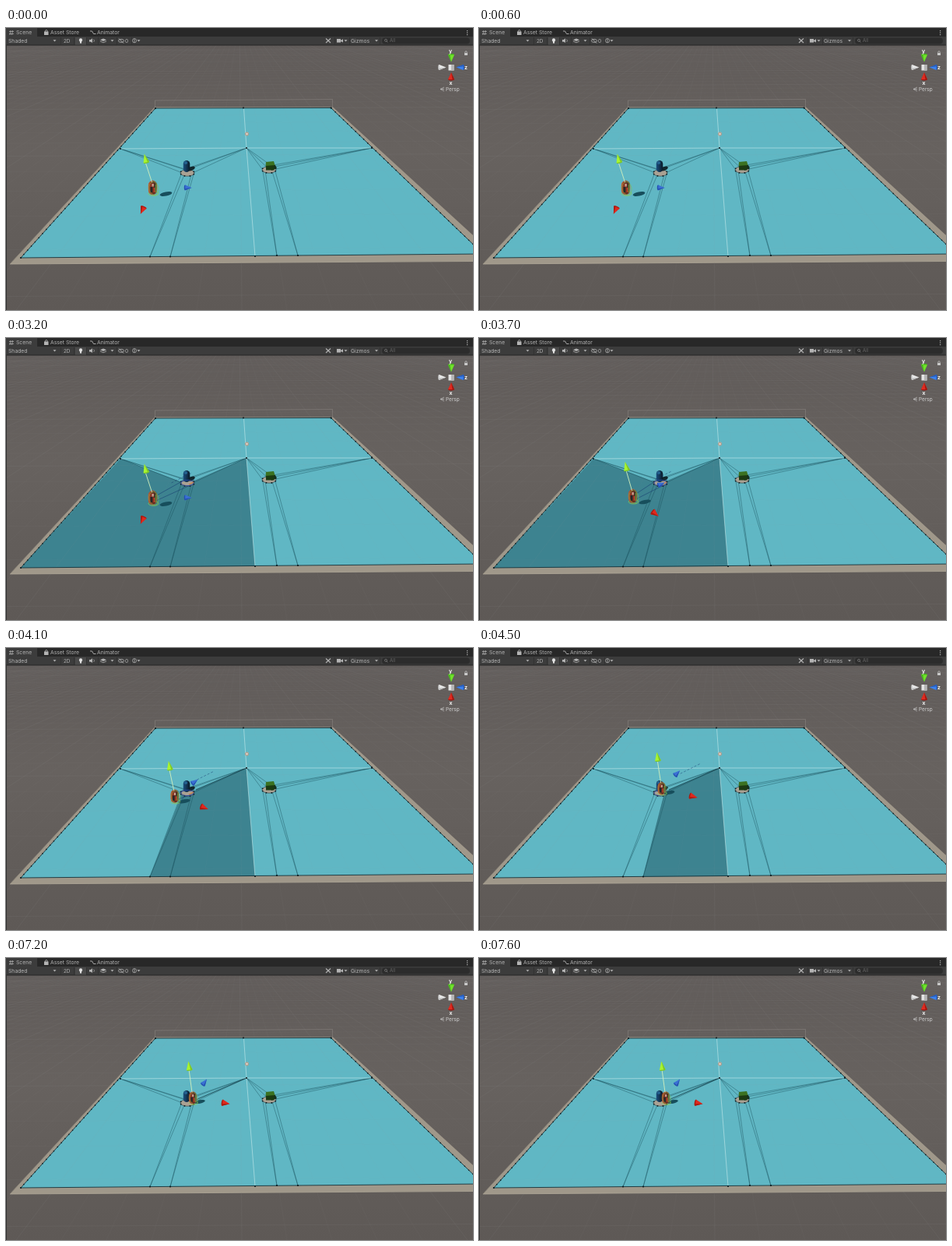
Animation, 600 px wide and 362 px high, one loop 8100 ms. Source, as an HTML page with a canvas:

```html
<!DOCTYPE html>
<html lang="en">
<head>
<meta charset="utf-8">
<title>Navigation mesh in the scene view</title>
<style>
html, body { margin: 0; width: 100%; height: 100%; overflow: hidden; background: #625d5b; }
canvas { display: block; }
</style>
</head>
<body>
<canvas id="stage" width="600" height="362"></canvas>
<script>
const ctx = document.getElementById('stage').getContext('2d');
const LOOP = 8100, WALK_START = 3300, WALK_TIME = 1500, TURN_START = 3200, PATH_END = 4700;
const GREY = '#b4b4b4';
const HUB = [309, 154], WEST = [147, 155], EAST = [470, 154];
const FLOOR = [[192, 103], [417.5, 102.5], [613, 290], [19, 295]];

const clamp = v => Math.min(1, Math.max(0, v));
const ease = v => v * v * (3 - 2 * v);
const mix = (a, b, u) => a + (b - a) * u;

function trace(points) {
  ctx.beginPath();
  for (const [x, y] of points) ctx.lineTo(x, y);
}

function line(color, width, ...points) {
  trace(points);
  ctx.strokeStyle = color;
  ctx.lineWidth = width;
  ctx.stroke();
}

function poly(color, ...points) {
  trace(points);
  ctx.fillStyle = color;
  ctx.fill();
}

function rect(color, x, y, w, h) {
  ctx.fillStyle = color;
  ctx.fillRect(x, y, w, h);
}

function oval(color, x, y, rx, ry, turn = 0) {
  ctx.beginPath();
  ctx.ellipse(x, y, rx, ry, turn, 0, 7);
  ctx.fillStyle = color;
  ctx.fill();
}

function ring(color, x, y, rx, ry, turn = 0, width = 0.8) {
  ctx.beginPath();
  ctx.ellipse(x, y, rx, ry, turn, 0, 7);
  ctx.strokeStyle = color;
  ctx.lineWidth = width;
  ctx.stroke();
}

function text(str, x, y, size = 6.8, color = GREY, weight = 400) {
  ctx.font = `${weight} ${size}px Inter, Roboto, sans-serif`;
  ctx.fillStyle = color;
  ctx.fillText(str, x, y);
}

function cone(x, y, angle, light, dark, len = 10, half = 3.8) {
  ctx.save();
  ctx.translate(x, y);
  ctx.rotate(angle);
  oval(dark, -len / 2, 0, 1.4, half);
  poly(light, [len / 2, 0], [-len / 2, -half], [-len / 2, half]);
  poly(dark, [len / 2, 0], [-len / 2, half], [-len / 2, half * 0.4]);
  ctx.restore();
}

function capsule(x, y, w, h, light, dark) {
  const fill = ctx.createLinearGradient(x - w / 2, 0, x + w / 2, 0);
  fill.addColorStop(0, light);
  fill.addColorStop(1, dark);
  ctx.beginPath();
  ctx.roundRect(x - w / 2, y - h / 2, w, h, w / 2);
  ctx.fillStyle = fill;
  ctx.fill();
}

// Position, heading and handle offsets of the walking agent
function pose(t) {
  const p = ease(clamp((t - WALK_START) / WALK_TIME));
  const yaw = (13 + 95 * Math.exp(-Math.max(0, t - TURN_START) / 500)) * Math.PI / 180;
  const cos = Math.cos(yaw), sin = Math.sin(yaw);
  return {
    p,
    x: mix(188.5, 240, p),
    y: mix(205, 179.5, ease(p)),
    red: [44 * cos, 31 * sin],
    blue: [6 + 42 * sin, -5 - 16 * cos],
    up: [mix(-9.5, -5, p), mix(-38, -41.5, p)],
    moving: t >= TURN_START && t < PATH_END,
  };
}

// Perspective grid meeting at a point just above the stage
function grid(alpha) {
  const color = i => `rgba(150,150,150,${i % 5 ? alpha : alpha * 1.8})`;
  for (let i = -60; i <= 60; i++) line(color(i), 0.7, [300, -17], [303 + i * 58, 362]);
  for (let k = 4; k < 42; k++) {
    const y = -17 + 1800 / k;
    line(color(k), 0.7, [0, y + 1.5], [600, y - 1.5]);
  }
}

function ground() {
  const shade = ctx.createLinearGradient(0, 22, 0, 362);
  shade.addColorStop(0, '#605b59');
  shade.addColorStop(0.4, '#67625f');
  shade.addColorStop(1, '#5e5956');
  rect(shade, 0, 22, 600, 340);
  grid(0.09);
}

// The dark corridor starts at the last mesh edge that the agent has crossed
function corridor({ x, y, moving }) {
  if (!moving) return;
  const gates = [
    [[19, 295], WEST, [226, 185]],
    [[185, 293.5], [226, 187]],
    [[211, 293.5], [238, 188]],
  ];
  const radius = 5, foot = y + 9;
  const crossed = gates.filter(([a, b]) => x + radius > mix(a[0], b[0], (foot - a[1]) / (b[1] - a[1])));
  poly('#3d8390', ...crossed.at(-1), [242, 183], HUB, [320, 293]);
}

function floor(agent) {
  poly('#a0988a', [191, 101.5], [420, 101.5], [636, 299], [5, 303]);
  line('#b3ab9b', 0.8, [5, 303], [600, 299.5]);
  line('#8b8479', 0.8, [5, 303], [191, 102]);
  poly('#60b7c4', ...FLOOR);
  corridor(agent);
  ctx.save();
  trace(FLOOR);
  ctx.clip();
  grid(0.06);
  ctx.restore();
  line('rgba(165,160,155,.45)', 0.7, [191.5, 103], [191.5, 93], [419.5, 91.5], [419.5, 102]);
}

function meshLines({ x, y, hubs, feet }) {
  const thin = (...points) => line('rgba(22,75,88,.7)', 0.6, ...points);
  for (const hub of hubs) {
    for (const side of [-1, 1]) thin(hub, [x + side * 9, y - 1]);
    thin(hub, [x - 4, y - 4.4]);
  }
  feet.forEach((foot, i) => {
    const side = i ? 1 : -1;
    thin([x + side * 8, y + 2], foot);
    thin([x + side * 4.5, y + 4], foot);
  });
}

const OBSTACLES = [
  { x: 233, y: 186, hubs: [WEST, HUB], feet: [[185, 293.5], [211, 293.5]] },
  { x: 338, y: 182, hubs: [HUB, EAST], feet: [[348, 292], [375, 292]] },
];

function mesh(agent) {
  OBSTACLES.forEach(meshLines);
  if (agent.p > 0.5) line('rgba(18,60,72,.7)', 1.1, [244, 182], HUB);
  line('rgba(205,238,238,.7)', 0.8, WEST, HUB, EAST);
  line('rgba(205,238,238,.7)', 0.8, [305.5, 103], HUB, [320, 293]);
  line('#16333a', 0.9, ...FLOOR, FLOOR[0]);
  ctx.setLineDash([1.2, 6]);
  line('#0a181c', 1.5, FLOOR[0], FLOOR[3]);
  line('#0a181c', 1.5, FLOOR[1], FLOOR[2]);
  ctx.setLineDash([]);
  const nodes = [...FLOOR, HUB, WEST, EAST, [305, 102.5], [320, 293], ...OBSTACLES.flatMap(o => o.feet)];
  for (const [x, y] of nodes) oval('#0b1b20', x, y, 1.1, 1.1);
}

function base({ x, y }) {
  oval('#aaa193', x, y, 9, 4.2);
  ring('#2b3c3e', x, y, 9, 4.2, 0, 0.6);
  for (let i = 0; i < 8; i++) {
    const a = i * Math.PI / 4 + 0.4;
    oval('#0b1b20', x + 9 * Math.cos(a), y + 4.2 * Math.sin(a), 0.9, 0.9);
  }
}

function obstacles() {
  OBSTACLES.forEach(base);
  oval('#12272d', 238, 180.5, 5, 2.4, -0.4);
  capsule(232, 177.5, 8.5, 15, '#1b4f7e', '#0a1a27');
  oval('#24618f', 231, 173, 2.2, 2);
  poly('#15301f', [341, 183], [348, 180], [346, 176], [341, 176]);
  rect('#1c3a12', 334, 174, 10.5, 8.5);
  poly('#3b7222', [334, 172], [344, 171], [345.5, 176], [333.5, 177]);
  oval('#d9cfc4', 309.5, 136, 2.4, 2.4);
  ring('#8d6b55', 309.5, 136, 2, 2, 0, 0.6);
}

function route({ x, y }) {
  const blue = 'rgba(20,55,110,.65)';
  line(blue, 0.8, [x, y], [226, 184], [242, 182]);
  line(blue, 0.8, [x + 4, y + 4], [241, 187]);
  ctx.setLineDash([3, 2]);
  line(blue, 0.7, [x + 24, y - 19], [x + 50, y - 32]);
  ctx.setLineDash([]);
  ring('#2849a8', 233, 186, 8, 3.6);
  line('#d87938', 1, [235, 188], [241, 185]);
}

function body({ x, y, p }) {
  const scale = 1 - p * 0.13;
  oval('#174e5c', x + 17 - 8 * p, y + 8 - 3 * p, 8 * scale, 2.6 * scale, -0.2);
  ctx.save();
  ctx.translate(x, y);
  ctx.scale(scale, scale);
  ring('#8fd04e', 1, 7.5, 6.5, 2.8, 0, 0.7);
  capsule(0, 0, 11, 18, '#b53a22', '#2e2524');
  rect('#c9a594', -1, -5, 2.3, 3.5);
  rect('#25282b', -3, -1, 2.6, 7);
  rect('#c8452a', 1.2, 0, 2, 6);
  capsule(4, 1, 2, 11, '#43642f', '#6da447');
  ring('#d07a42', 0, 0, 5.6, 9.2, 0, 0.6);
  ring('#79c14c', 1.5, 1, 6, 8.5, -0.2, 0.6);
  ctx.restore();
}

function handles({ x, y, red, blue, up }) {
  const handle = ([dx, dy], ...look) => cone(x + dx, y + dy, Math.atan2(dy, dx), ...look);
  line('#d2f0bd', 0.9, [x - 1, y - 7], [x + up[0], y + up[1] + 5]);
  handle(red, '#e0281d', '#a8190f', 9.5, 4);
  handle(blue, '#3a70d4', '#2450b0', 8.5, 3.4);
  handle(up, '#a8f431', '#7cc427', 11, 3.8);
}

function compass() {
  cone(561, 50.5, 0, '#e8e8e8', '#bdbdbd', 9, 3.4);
  cone(583, 50.5, Math.PI, '#3c82ee', '#2459b8', 9, 3.4);
  cone(572, 39, Math.PI / 2, '#70e32a', '#48b31d', 9, 4);
  cone(572, 61.5, -Math.PI / 2, '#e02b20', '#9d1711', 9, 4);
  rect('#e4e4e4', 568.5, 47, 7, 7.5);
  rect('#b5b5b5', 572, 47, 3.5, 7.5);
  text('y', 569, 31.5, 7, '#fff', 600);
  text('z', 589, 52.5, 7, '#fff', 600);
  text('x', 569.5, 72.5, 7, '#fff', 600);
  line('#c4c4c4', 0.7, [563, 76], [558, 78.5], [563, 81]);
  line('#c4c4c4', 0.7, [558, 78.5], [563, 78.5]);
  text('Persp', 565, 81, 6.5, '#d0d0d0');
  rect('#c8c8c8', 589, 32, 4, 3);
  ring('#c8c8c8', 591, 31.5, 1.3, 1.8, 0, 0.7);
}

const caret = x => poly(GREY, [x - 2, 15.2], [x + 2, 15.2], [x, 17.5]);

function tabs() {
  rect('#282828', 0, 0, 600, 12);
  rect('#3c3c3c', 0, 0, 40, 12);
  for (let i = 0; i < 2; i++) {
    line(GREY, 0.7, [4, 4.5 + i * 3], [10, 4.5 + i * 3]);
    line(GREY, 0.7, [6 + i * 2.5, 3], [5 + i * 2.5, 9]);
  }
  text('Scene', 13, 8.3);
  rect(GREY, 49, 4.5, 5.5, 4.5);
  ring(GREY, 51.8, 4.3, 1.4, 1.8);
  text('Asset Store', 57, 8.3);
  line(GREY, 0.9, [108, 4], [110.5, 4], [112.5, 7.5], [115.5, 7.5]);
  text('Animator', 117, 8.3);
  for (let i = 0; i < 3; i++) rect(GREY, 592, 3 + i * 2.5, 1.2, 1.2);
}

function toolbar() {
  rect('#3c3c3c', 0, 11, 600, 11);
  rect('#242424', 0, 21.5, 600, 1);
  rect('#303030', 0, 22, 1, 340);
  rect('#4a4a4a', 89, 12, 14, 9.5);
  for (const x of [70, 87, 103, 118, 142, 161, 422, 441, 480]) rect('#303030', x, 12, 0.8, 9.5);
  for (const x of [62.5, 136.5, 170.5, 436.5, 476]) caret(x);

  text('Shaded', 3, 18.6);
  text('2D', 74, 18.6, 6.3);
  oval('#e2e2e2', 96, 15.5, 2.1, 2.3);
  rect('#e2e2e2', 95, 17, 2, 2.6);
  poly(GREY, [107, 15], [109, 15], [111, 13.3], [111, 19], [109, 17.8], [107, 17.8]);
  line(GREY, 0.7, [112.5, 14.5], [113.5, 16.3], [112.5, 18]);
  poly(GREY, [121, 15.2], [125, 13.5], [129, 15.2], [125, 17]);
  line(GREY, 0.8, [121, 17], [125, 18.8], [129, 17]);
  ring(GREY, 148, 16.4, 3.6, 2);
  line(GREY, 0.9, [145, 13.5], [151, 19.5]);
  text('0', 153, 18.6, 6.5);
  ring(GREY, 165, 16.2, 2.6, 2.6, 0, 0.7);
  line(GREY, 0.7, [165, 13.5], [165, 19]);

  line(GREY, 1.1, [411, 13.5], [417, 19]);
  line(GREY, 1.1, [417, 13.5], [411, 19]);
  rect(GREY, 425, 14, 5, 4.6);
  poly(GREY, [430, 16], [433, 14.3], [433, 18.5], [430, 17]);
  text('Gizmos', 443, 18.6);
  capsule(539.5, 16.5, 113, 8, '#2c2c2c', '#2c2c2c');
  ring('#858585', 488, 15.8, 1.5, 1.5, 0, 0.7);
  line('#858585', 0.7, [489, 17], [490.5, 18.4]);
  text('All', 493, 18.4, 6, '#666');
}

function draw(now) {
  // The picture advances in steps of a tenth of a second
  const agent = pose(Math.floor((now % LOOP) / 100) * 100);
  ground();
  floor(agent);
  mesh(agent);
  obstacles();
  if (agent.moving) route(agent);
  body(agent);
  handles(agent);
  compass();
  tabs();
  toolbar();
}

const start = performance.now();
function tick() {
  draw(performance.now() - start);
  requestAnimationFrame(tick);
}
tick();
</script>
</body>
</html>
```
